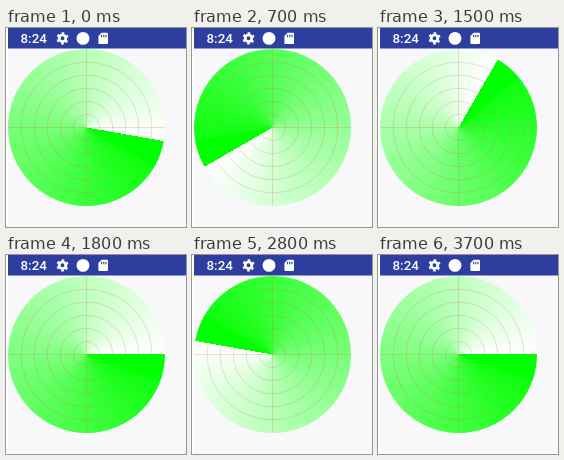
Recreate the animation shown at these times as an HTML page with a canvas. Size 180x199 px, loop 3800 ms.

```html
<!DOCTYPE html>
<html lang="en">
<head>
<meta charset="utf-8">
<title>Radar sweep</title>
<style>
  html, body { margin: 0; width: 100%; height: 100%; overflow: hidden; background: #f8f8fb; }
  canvas, svg { position: absolute; left: 0; top: 0; width: 180px; height: 199px; }
  text { font: 500 13.4px Roboto, sans-serif; fill: #fff; }
</style>
</head>
<body>
<canvas id="radar" width="180" height="199"></canvas>
<svg viewBox="0 0 180 199">
  <rect width="2" height="199" fill="#fff"/>
  <rect x="2" width="178" height="20.5" fill="#2e3e9e"/>
  <text x="14.5" y="15">8:24</text>
  <g fill="none" stroke="#fff" transform="translate(56.5 10.3)">
    <circle r="3.3" stroke-width="2.7"/>
    <circle r="5.2" stroke-width="1.8" stroke-dasharray="2.6 2.845" transform="rotate(75.7)"/>
  </g>
  <circle cx="77" cy="10.4" r="6.4" fill="#fff"/>
  <path d="M95.6 4.8H101a1 1 0 0 1 1 1V15a1 1 0 0 1-1 1H93.400a1 1 0 0 1-1-1V8z" fill="#fff"/>
  <path d="M95.600 6.800v2.400M97.800 6.800v2.400M100 6.800v2.400" stroke="#2e3e9e" stroke-width="1.100"/>
</svg>
<script>
const LOOP = 3800, TICK = 100;
const CX = 80.5, CY = 99.5, R = 78.5, RINGS = 6;
const SLOW_TICKS = [14, 23, 37]; // ticks that advance half as far
const ctx = document.getElementById('radar').getContext('2d');

function sweepAngle(ms) {
  const tick = Math.floor((ms % LOOP) / TICK);
  const slow = SLOW_TICKS.filter(t => t <= tick).length;
  return 10 + 20 * tick - 10 * slow;
}

function conic(deg, stops) {
  const g = ctx.createConicGradient((deg % 360) * Math.PI / 180, CX, CY);
  for (const [at, color] of stops) g.addColorStop(at, color);
  return g;
}

function circle(r) {
  ctx.beginPath();
  ctx.arc(CX, CY, r, 0, 2 * Math.PI);
}

function drawGrid(deg) {
  // The grid sinks into the brightest part of the sweep.
  ctx.strokeStyle = conic(deg, [
    [0, 'rgba(205,110,80,0)'],
    [0.06, 'rgba(205,110,80,0.03)'],
    [0.25, 'rgba(205,110,80,0.25)'],
    [1, 'rgba(205,110,80,0.25)']
  ]);
  ctx.lineWidth = 1;
  for (let i = 1; i < RINGS; i++) {
    circle(R * i / RINGS);
    ctx.stroke();
  }
  ctx.beginPath();
  ctx.moveTo(CX - R, CY);
  ctx.lineTo(CX + R, CY);
  ctx.moveTo(CX, CY - R);
  ctx.lineTo(CX, CY + R);
  ctx.stroke();
}

function draw(ms) {
  const deg = sweepAngle(ms);
  ctx.clearRect(0, 0, 180, 199);
  ctx.fillStyle = conic(deg, [
    [0, '#00ff00'],
    [20 / 360, '#00ff00'],
    [20 / 360, 'rgb(14,255,14)'],
    [1, '#ffffff']
  ]);
  circle(R);
  ctx.fill();
  drawGrid(deg);
}

let start;
function frame(now) {
  start ??= now;
  draw(Math.max(0, now - start));
  requestAnimationFrame(frame);
}
draw(0);
requestAnimationFrame(frame);
</script>
</body>
</html>
```
